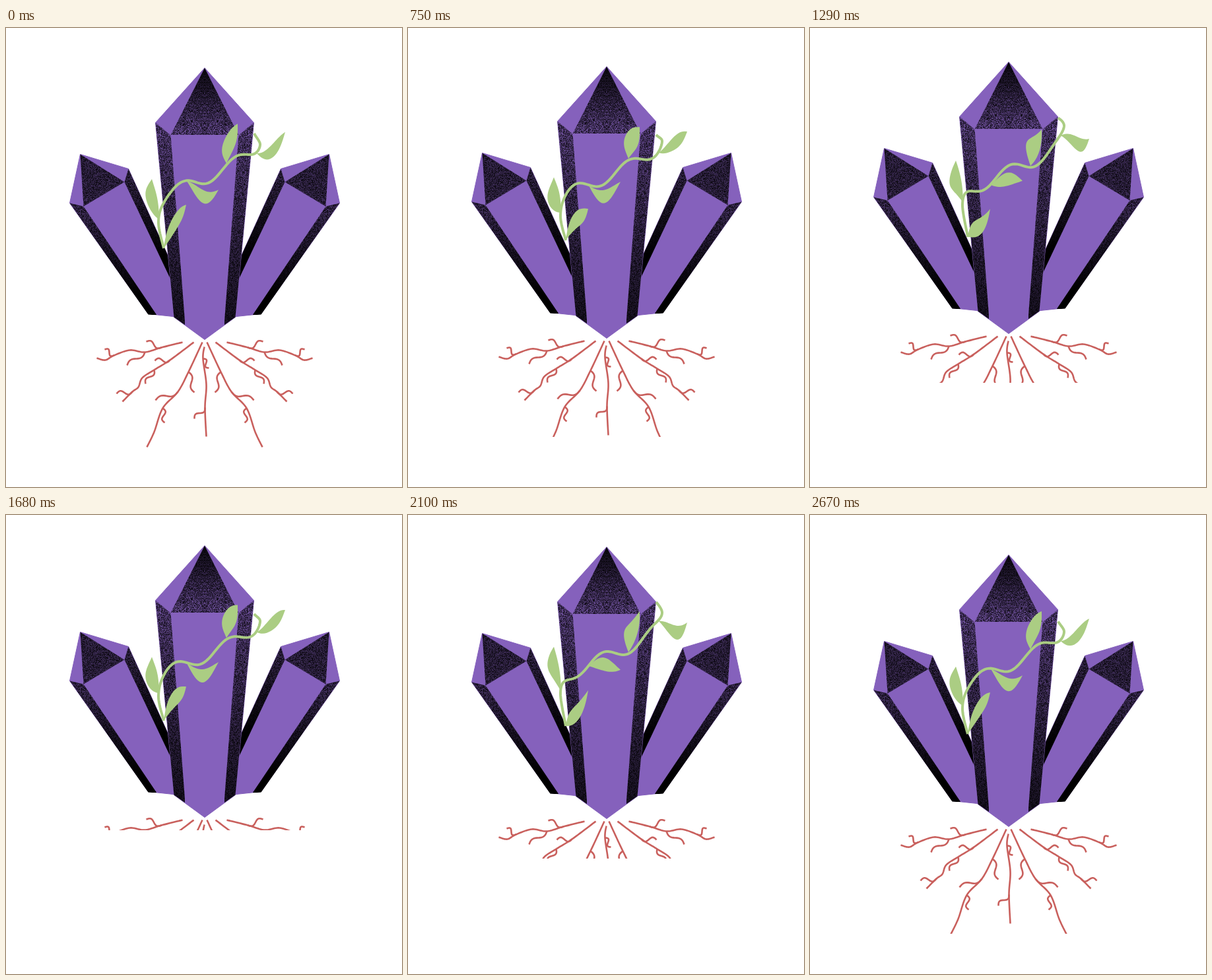
Recreate the animation shown at these times as an HTML page with a canvas. Size 600x696 px, loop 2700 ms.

```html
<!DOCTYPE html>
<html lang="en">
<head>
<meta charset="utf-8">
<title>Crystals</title>
<style>
  html, body { margin: 0; width: 100%; height: 100%; overflow: hidden; background: #fff; }
  canvas { display: block; }
</style>
</head>
<body>
<canvas id="stage" width="600" height="696"></canvas>
<script>
const W = 600, H = 696, LOOP = 2700, WAVE_PERIOD = 900, TAU = 2 * Math.PI;
const PURPLE = '#8561bc', GREEN = '#abcd83', RED = '#c9605d';
const ctx = document.getElementById('stage').getContext('2d');

const lerp = (a, b, k) => a + (b - a) * k;
const steps = n => Array.from({ length: n + 1 }, (_, i) => i / n);

// Linear interpolation through [time, value] pairs.
function track(keys, t) {
  const i = Math.max(1, keys.findIndex(k => k[0] >= t));
  const [t0, v0] = keys[i - 1], [t1, v1] = keys[i];
  return lerp(v0, v1, (t - t0) / (t1 - t0));
}

// Catmull-Rom curve through points, returned as samples.
function spline(points) {
  const at = i => points[Math.min(points.length - 1, Math.max(0, i))];
  return points.slice(1).flatMap((_, i) => steps(12).map(u => [0, 1].map(axis => {
    const [a, b, c, d] = [-1, 0, 1, 2].map(k => at(i + k)[axis]);
    return b + u * (c - a + u * (2 * a - 5 * b + 4 * c - d + u * (3 * (b - c) + d - a))) / 2;
  })));
}

// Line between two points, pushed to its left by offset(u) pixels.
function bulge([x0, y0], [x1, y1], offset) {
  const dx = x1 - x0, dy = y1 - y0, length = Math.hypot(dx, dy);
  return steps(20).map(u => {
    const push = offset(u) / length;
    return [x0 + dx * u + dy * push, y0 + dy * u - dx * push];
  });
}

function trace(g, points) {
  g.beginPath();
  points.forEach(([x, y]) => g.lineTo(x, y));
}

function layer(paint) {
  const canvas = document.createElement('canvas');
  canvas.width = W;
  canvas.height = H;
  const g = canvas.getContext('2d');
  g.translate(.5, .5);
  paint(g);
  return canvas;
}

// Paints the left half, then its reflection.
function mirrored(g, paint) {
  paint();
  g.save();
  g.transform(-1, 0, 0, 1, 601, 0);
  paint();
  g.restore();
}

function solid(g, points) {
  trace(g, points);
  g.closePath();
  g.fillStyle = g.strokeStyle = PURPLE;
  g.fill();
  g.stroke();
}

// Black speckles inside a polygon; density runs from top to bottom.
function grain(g, points, top, bottom) {
  let seed = 7;
  const random = () => (seed = (seed * 16807) % 2147483647) / 2147483647;
  const xs = points.map(p => p[0]), ys = points.map(p => p[1]);
  const y0 = Math.min(...ys), y1 = Math.max(...ys);
  g.save();
  trace(g, points);
  g.clip();
  g.fillStyle = '#000';
  for (let y = y0; y < y1; y++) {
    const density = Math.min(1, lerp(top, bottom, (y - y0) / (y1 - y0)));
    const spread = 1.6 * Math.min(density, 1 - density);
    for (let x = Math.min(...xs); x < Math.max(...xs); x++) {
      g.globalAlpha = density + (random() - .5) * spread;
      g.fillRect(x - .5, y - .5, 1, 1);
    }
  }
  g.restore();
}

const crystals = layer(g => {
  mirrored(g, () => {
    solid(g, [[112, 191], [185, 213], [246, 347], [262, 438], [215, 433], [96, 265]]);
    grain(g, [[112, 191], [179, 233], [117, 270]], .74, .7);
    grain(g, [[96, 265], [117, 270], [228, 435], [215, 434]], .64, 1.08);
    grain(g, [[185, 213], [179, 233], [251, 385], [246, 347]], .68, 1.1);
  });
  solid(g, [[300.5, 60], [375, 143], [347, 438], [300.5, 472], [254, 438], [226, 143]]);
  mirrored(g, () => {
    grain(g, [[300.5, 60], [249, 162], [300.5, 162]], .95, .48);
    grain(g, [[226, 143], [249, 162], [271, 450], [254, 438]], .5, .88);
  });
});

// Forks are [index of the point they leave, dx, dy].
const SIDE_ROOTS = [
  { path: [[267, 476], [235, 484], [210, 491], [187, 488], [163, 496], [150, 503], [137, 500]],
    forks: [[1, -23, -9], [2, -27, 20], [4, -14, -9]] },
  { path: [[284, 476], [248, 503], [224, 518], [206, 530], [200, 544], [191, 551], [176, 566]],
    forks: [[1, -23, 1], [2, -13, 21], [5, -24, 3]] },
  { path: [[297, 476], [276, 521], [260, 551], [237, 576], [224, 612], [213, 635]],
    forks: [[1, 9, 31], [2, -34, 13], [3, 3, 22]] },
];
const CENTRE_ROOT = {
  path: [[300, 483], [298, 501], [303, 540], [301, 575], [303, 619]],
  forks: [[1, 9, 14], [3, -16, 17]],
};

const roots = layer(g => {
  g.strokeStyle = RED;
  g.lineWidth = 2.6;
  const line = points => { trace(g, points); g.stroke(); };
  const drawRoot = ({ path, forks }) => {
    line(spline(path));
    for (const [i, dx, dy] of forks) {
      const [x, y] = path[i];
      line(bulge([x, y], [x + dx, y + dy], u => 3.5 * Math.sin(TAU * u)));
    }
  };
  mirrored(g, () => SIDE_ROOTS.forEach(drawRoot));
  drawRoot(CENTRE_ROOT);
});

// The vine at rest; the ripple gives it its bends.
const stem = spline([[239, 328], [231, 284], [241, 257], [274, 240], [313, 222],
  [346, 206], [375, 186], [385, 167], [376, 154]]);

function leaf(base, tip, left, right) {
  const side = width => bulge(base, tip, u => width * Math.sin(Math.PI * u));
  return [...side(left), ...side(-right).reverse()];
}
const leaves = [
  leaf([232, 281], [221, 220], 15, 3),
  leaf([239, 328], [273, 277], 9, 8),
  leaf([274, 241], [322, 241], 3, 17),
  leaf([334, 210], [351, 155], 15, 6),
  leaf([380, 182], [423, 167], 1, 19),
];

// Vertical ripple that travels to the right.
const ripple = (x, t) => 10 * Math.cos(TAU * (t / WAVE_PERIOD - .56 - (x - 272) / 80.5));

function drawVine(t) {
  const bend = points => points.map(([x, y]) => [x, y + ripple(x, t)]);
  ctx.fillStyle = ctx.strokeStyle = GREEN;
  ctx.lineWidth = 4;
  trace(ctx, bend(stem));
  ctx.stroke();
  leaves.forEach(l => { trace(ctx, bend(l)); ctx.fill(); });
}

const LIFT = [[0, 0], [600, 0], [1770, -15.2], [1920, -15.2], [2670, 0], [LOOP, 0]];
const ROOT_EDGE = [[0, 643], [600, 643], [1800, 460], [LOOP, 641]];

function draw(now) {
  const t = now % LOOP;
  const lift = Math.round(track(LIFT, t));
  ctx.fillStyle = '#fff';
  ctx.fillRect(0, 0, W, H);

  ctx.save();
  ctx.beginPath();
  ctx.rect(0, 0, W, Math.round(track(ROOT_EDGE, t)));
  ctx.clip();
  ctx.drawImage(roots, 0, lift);
  ctx.restore();

  ctx.save();
  ctx.translate(0, lift);
  ctx.drawImage(crystals, 0, 0);
  drawVine(t);
  ctx.restore();
}

const start = performance.now();
function tick() {
  draw(performance.now() - start);
  requestAnimationFrame(tick);
}
tick();
</script>
</body>
</html>
```
